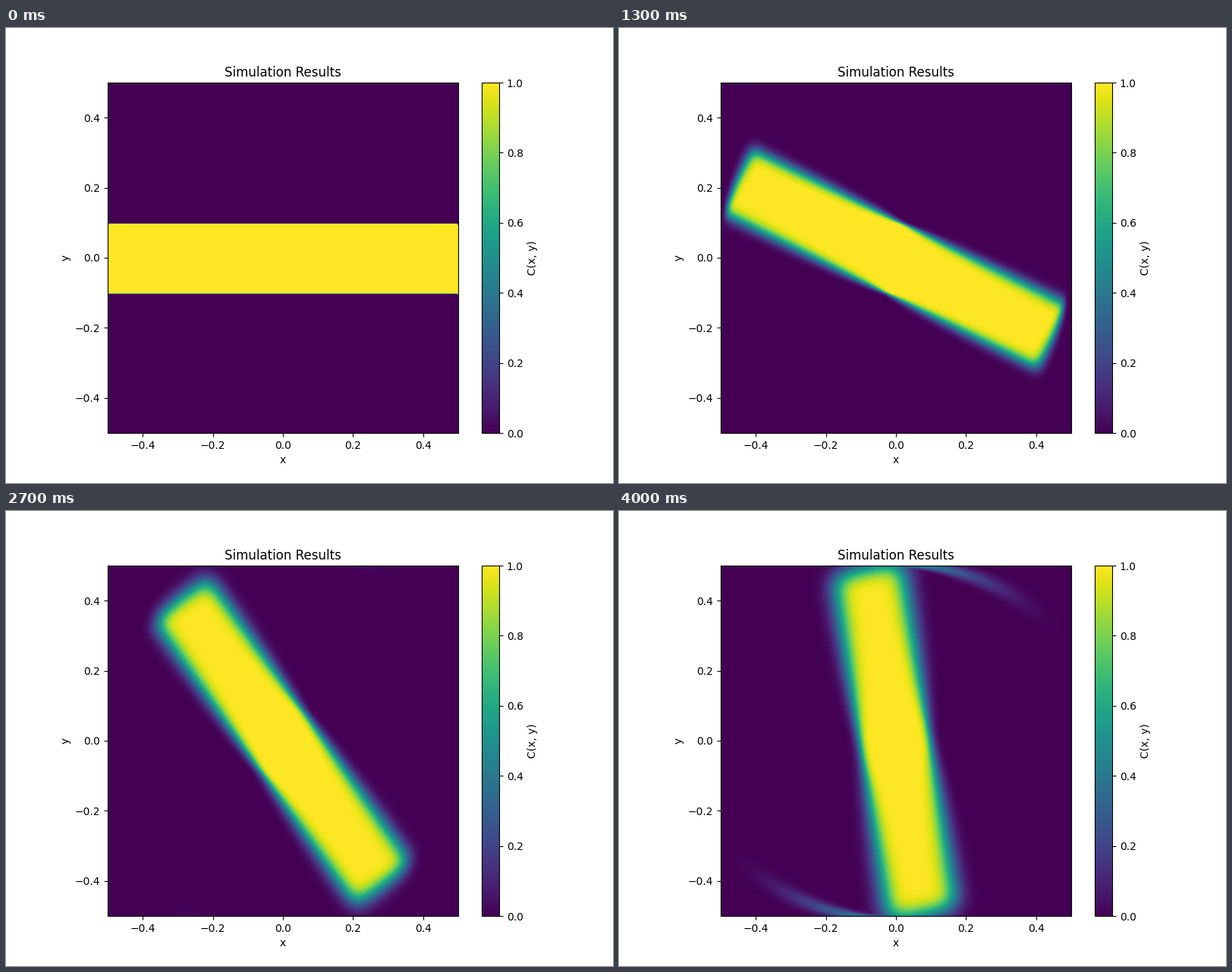
Animation of 800 by 600 pixels, one loop 4.05 s. Source, as a matplotlib script:

```python
import numpy as np
import matplotlib.pyplot as plt
from matplotlib.animation import FuncAnimation

N = 400                 # cells per side of the periodic unit square
DX = 1.0 / N
DT = 0.00125
FRAMES = 81
STEPS_PER_FRAME = 10

centers = (np.arange(N) + 0.5) * DX - 0.5
# Courant numbers of the clockwise solid-body rotation
cu = (np.sqrt(2) * centers * DT / DX)[:, None].astype(np.float32)
cv = (-np.sqrt(2) * centers * DT / DX)[None, :].astype(np.float32)
cu_pos, cu_neg = np.maximum(cu, 0), np.minimum(cu, 0)
cv_pos, cv_neg = np.maximum(cv, 0), np.minimum(cv, 0)


def upwind_step(c):
    """First-order upwind advection with periodic edges."""
    west, east = np.roll(c, 1, axis=1), np.roll(c, -1, axis=1)
    south, north = np.roll(c, 1, axis=0), np.roll(c, -1, axis=0)
    return (c - cu_pos * (c - west) - cu_neg * (east - c)
              - cv_pos * (c - south) - cv_neg * (north - c))


def padded(c):
    """Close the periodic field with one more column and row."""
    c = np.hstack([c, np.roll(c[:, :1], -1, axis=0)])
    return np.vstack([c, c[:1]])


def simulate():
    band = (np.abs(centers) <= 0.1).astype(np.float32)
    c = np.repeat(band[:, None], N, axis=1)
    fields = [padded(c)]
    for _ in range(FRAMES - 1):
        for _ in range(STEPS_PER_FRAME):
            c = upwind_step(c)
        fields.append(padded(c))
    return fields


fields = simulate()

fig, ax = plt.subplots(figsize=(8, 6), dpi=100)
image = ax.imshow(fields[0], origin="lower", cmap="viridis", vmin=0, vmax=1,
                  extent=(-0.5 - DX, 0.5, -0.5 - DX, 0.5),
                  interpolation="bilinear")
ax.set(xlim=(-0.5, 0.5), ylim=(-0.5, 0.5), xlabel="x", ylabel="y",
       title="Simulation Results")
fig.colorbar(image, ax=ax, label="C(x, y)")


def update(frame):
    image.set_data(fields[frame])
    return [image]


anim = FuncAnimation(fig, update, frames=FRAMES, interval=50, repeat=True)
plt.show()
```
